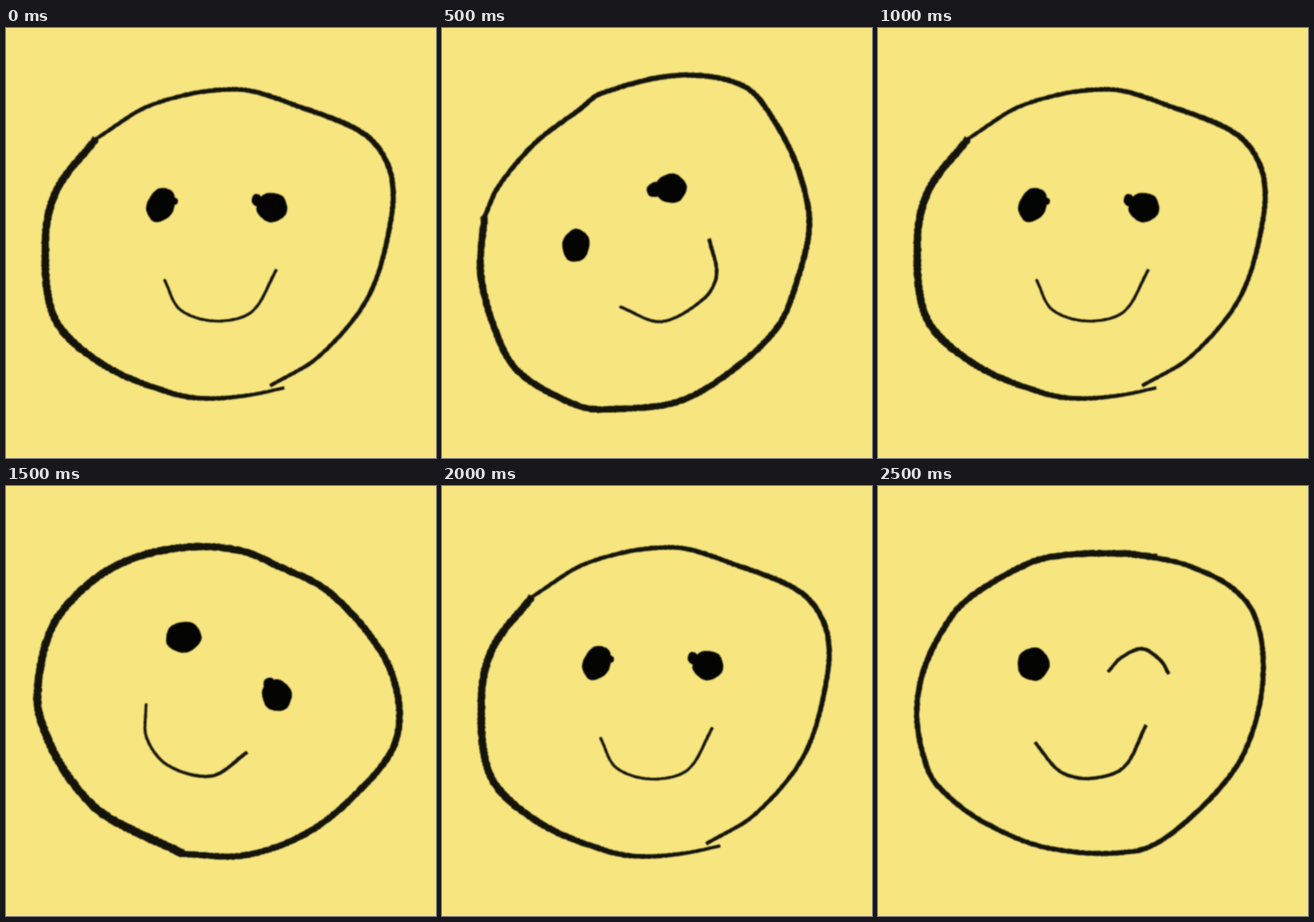
An HTML page that plays this animation: 700x700 px, repeating every 3000 ms.

```html
<!DOCTYPE html>
<html lang="en">
<head>
<meta charset="utf-8">
<title>Winking doodle</title>
<style>
html, body { margin: 0; width: 100%; height: 100%; overflow: hidden; background: #f7e57f; }
svg { display: block; width: 100vw; height: 100vh; }
g { opacity: 0; filter: blur(.9px); }
path { fill: #14140a; stroke: #14140a; stroke-width: 2.4; stroke-linejoin: round; }
.eye { fill: #040502; stroke: none; }
</style>
</head>
<body>
<svg id="stage" viewBox="0 0 700 700"></svg>
<script>
// Lines: key points of a curve, then brush width at start, middle and end.
// Eyes: centre, radii and tilt in degrees of each ink blob.
const poses = [
  {
    lines: [
      ['452,586 400,597 335,603 275,596 160,549 80,474 64,350 82,265 146,181', 5, 12.5, 12],
      ['144,182 240,124 375,100 480,129 585,174 625,232 627,310 590,437 510,534 431,582', 6, 9, 6],
      ['258,410 283,458 340,477 400,462 440,394', 4.5, 4.5, 5]
    ],
    eyes: [[252, 288, 22, 29, 25], [274, 282, 6, 6, 0], [433, 292, 25, 24, 0], [408, 280, 8, 10, 0]]
  },
  {
    lines: [
      ['69,308 92,258 153,186 225,132 258,107 385,77 492,95 545,158 582,237 598,320 580,405 546,487 465,563 385,608 290,620 225,616 125,560 88,495 63,400 69,308', 7.5, 9.5, 11.5],
      ['290,454 357,478 427,440 447,401 435,344', 5, 5, 6.5]
    ],
    eyes: [[218, 354, 22, 27, 10], [373, 261, 25, 24, 0], [347, 263, 14, 12, -20]]
  },
  {
    lines: [
      ['287,598 160,535 105,478 68,412 51,345 75,230 140,155 215,115 305,99 385,106 440,129 525,172 611,270 639,350 632,422 580,491 495,562 390,601 285,599', 14, 11.5, 10],
      ['228,355 229,410 264,455 335,472 392,434', 4.5, 5, 6]
    ],
    eyes: [[289, 246, 29, 25, -10], [441, 341, 24, 26, -20], [429, 322, 10, 10, 0]]
  },
  {
    lines: [
      ['453,116 400,110 310,112 250,124 160,174 120,212 76,295 63,372 77,450 98,489 170,546 280,590 420,594 490,556 580,462 617,375 627,280 610,205 570,161 500,128 453,117', 11, 8, 8.5],
      ['375,302 395,280 430,265 460,284 473,305', 5.5, 6, 6],
      ['256,418 297,465 345,476 400,458 436,390', 5.5, 5.5, 6]
    ],
    eyes: [[253, 290, 26, 27, 0]]
  }
];
const order = [0, 1, 0, 2, 0, 3];
const LOOP = 3000;
const NS = 'http://www.w3.org/2000/svg';

const noise = n => {
  const s = Math.sin(n * 127.1) * 43758.5453;
  return (s - Math.floor(s)) * 2 - 1;
};
const lerp = (a, b, t) => a + (b - a) * t;
const dist = (p, q) => Math.hypot(q[0] - p[0], q[1] - p[1]);
const toPath = pts => 'M' + pts.map(p => p.map(v => v.toFixed(1)).join(' ')).join('L') + 'Z';

// Smooth curve through the points, sampled about every 3 px.
function curve(text) {
  const pts = text.split(' ').map(p => p.split(',').map(Number));
  const last = pts.length - 1, out = [];
  const slope = (i, k) => {
    const p = pts[Math.max(0, i - 1)], q = pts[Math.min(last, i + 1)];
    return (q[k] - p[k]) / (dist(p, pts[i]) + dist(pts[i], q));
  };
  for (let i = 0; i < last; i++) {
    const a = pts[i], b = pts[i + 1], len = dist(a, b), steps = Math.ceil(len / 3);
    for (let s = 0; s < steps; s++) {
      const t = s / steps, u = 1 - t;
      out.push([0, 1].map(k =>
        u * u * (1 + 2 * t) * a[k] + t * t * (3 - 2 * t) * b[k] +
        t * u * len * (u * slope(i, k) - t * slope(i + 1, k))));
    }
  }
  return out.concat([pts[last]]);
}

// Outline of a brush line with a rough edge.
function brush(text, start, middle, end) {
  const line = curve(text), last = line.length - 1, left = [], right = [];
  line.forEach(([x, y], i) => {
    const p = line[Math.max(0, i - 1)], q = line[Math.min(last, i + 1)], len = dist(p, q);
    const nx = (p[1] - q[1]) / len, ny = (q[0] - p[0]) / len;
    const t = 2 * i / last;
    const width = t < 1 ? lerp(start, middle, t) : lerp(middle, end, t - 1);
    const edge = seed => width / 2 - 1.2 + width * .06 * noise(i + seed);
    const l = edge(x), r = edge(y);
    left.push([x + nx * l, y + ny * l]);
    right.unshift([x - nx * r, y - ny * r]);
  });
  return toPath(left.concat(right));
}

// Slightly lumpy ellipse.
function blob(cx, cy, rx, ry, tilt) {
  const turn = tilt * Math.PI / 180, pts = [];
  for (let i = 0; i < 48; i++) {
    const a = i / 48 * 2 * Math.PI;
    const r = 1 + .025 * Math.sin(5 * a + cx) + .012 * noise(i + cy);
    const x = rx * r * Math.cos(a), y = ry * r * Math.sin(a);
    pts.push([cx + x * Math.cos(turn) - y * Math.sin(turn), cy + x * Math.sin(turn) + y * Math.cos(turn)]);
  }
  return toPath(pts);
}

function add(parent, tag, attrs = {}) {
  const el = document.createElementNS(NS, tag);
  for (const k in attrs) el.setAttribute(k, attrs[k]);
  return parent.appendChild(el);
}

const stage = document.getElementById('stage');
poses.forEach((pose, id) => {
  const g = add(stage, 'g');
  pose.lines.forEach(l => add(g, 'path', { d: brush(...l) }));
  pose.eyes.forEach(e => add(g, 'path', { class: 'eye', d: blob(...e) }));
  const steps = [...order, order[0]].map((p, i) => ({
    offset: i / order.length, opacity: p === id ? 1 : 0, easing: 'step-end'
  }));
  g.animate(steps, { duration: LOOP, iterations: Infinity });
});
</script>
</body>
</html>
```
